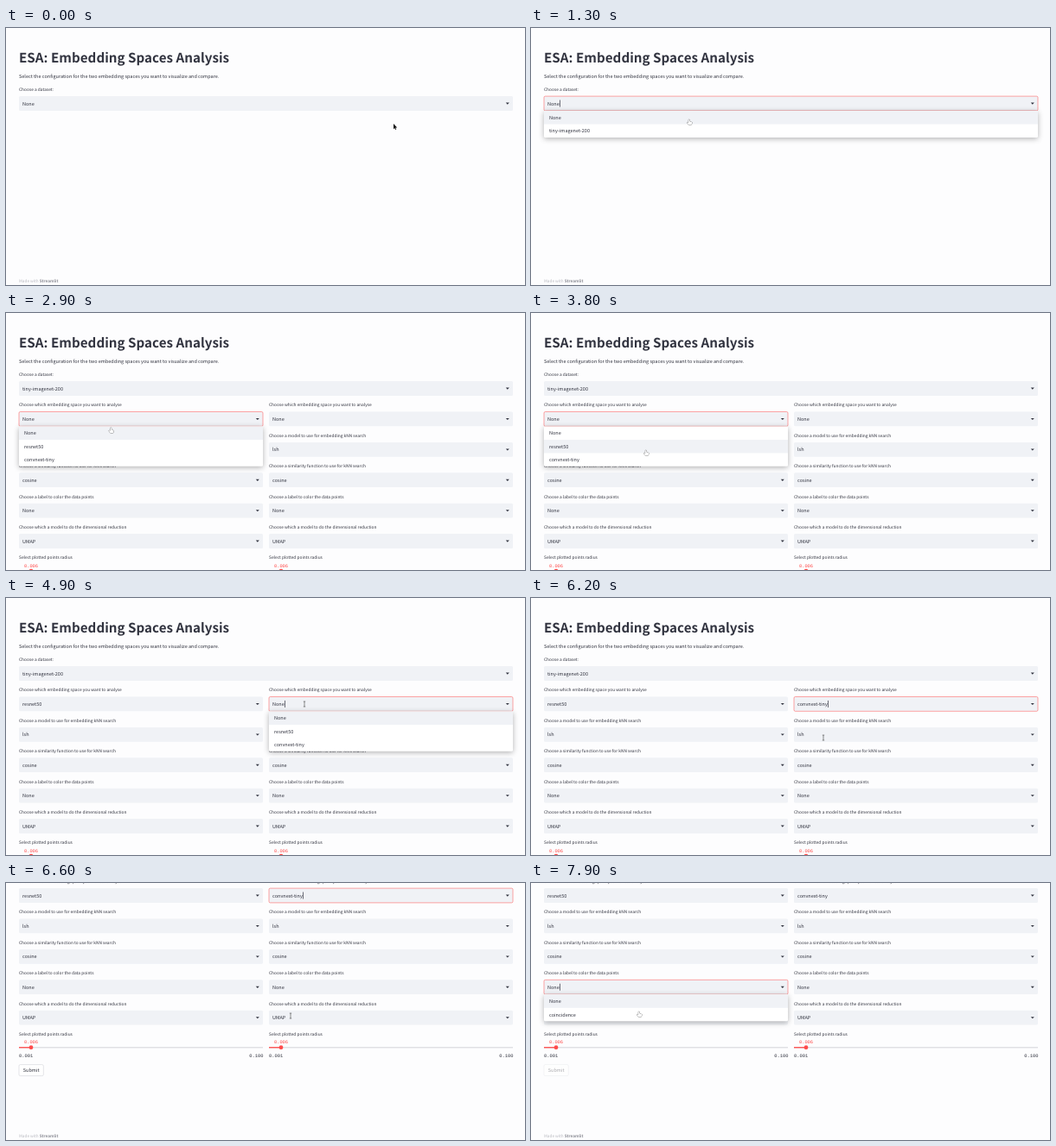
These frames come from a looping animation (600 by 298 pixels, 8000 ms). An HTML page with a canvas:

```html
<!DOCTYPE html>
<html lang="en">
<head>
<meta charset="utf-8">
<title>ESA: Embedding Spaces Analysis</title>
<style>
  html, body { margin: 0; width: 100%; height: 100%; overflow: hidden; background: #fdfdfe; }
  canvas { display: block; }
</style>
</head>
<body>
<canvas id="stage" width="600" height="298"></canvas>
<script>
const ctx = document.getElementById('stage').getContext('2d');
const LOOP = 8000, TICK = 100;
const INK = '#31333f', RED = '#ff4b4b', FIELD = '#f0f2f6', PAGE = '#fdfdfe';
const SANS = '"Noto Sans CJK JP", "Noto Sans CJK SC", "Open Sans", sans-serif';
const MONO = '"Liberation Mono", monospace';
const BODY = 5.52, SMALL = 4.85;
const COLUMNS = [15, 304], COLUMN_WIDTH = 282, FULL_WIDTH = 571;
const FIRST_ROW = 87.5, ROW_STEP = 35.4, ITEM = 15.45, MAX_SCROLL = 108.4;

const rows = [
  ['Choose a dataset:', 'None'],
  ['Choose which embedding space you want to analyse', 'None'],
  ['Choose a model to use for embedding kNN search', 'lsh'],
  ['Choose a similarity function to use for kNN search', 'cosine'],
  ['Choose a label to color the data points', 'None'],
  ['Choose which a model to do the dimensional reduction', 'UMAP'],
];

// Each visit: focus from open to blur, list shown from open to close, then options[pick] is set.
const spaces = ['None', 'resnet50', 'convnext-tiny'];
const visits = [
  { row: 0, col: 0, open: 600, close: 1700, blur: 2700, options: ['None', 'tiny-imagenet-200'], pick: 1, hover: [[0, 0], [1500, 1]] },
  { row: 1, col: 0, open: 2700, close: 4000, blur: 4900, options: spaces, pick: 1, hover: [[0, 0], [3100, 1]], noCaret: true },
  { row: 1, col: 1, open: 4900, close: 6000, blur: 7300, options: spaces, pick: 2, hover: [[0, 0], [5300, 1], [5700, 2]] },
  { row: 4, col: 0, open: 7300, close: LOOP, blur: LOOP, options: ['None', 'coincidence'], pick: 1, hover: [[0, 0]] },
];

// time, x, y
const mousePath = [
  [0, 448, 111], [300, 339, 84], [500, 338, 84], [900, 230, 92], [1300, 183, 109],
  [1600, 172, 119], [1700, 170, 119], [2200, 117, 125], [2300, 118, 126], [2700, 118, 126],
  [3300, 131, 164], [3700, 131, 164], [3800, 133, 162], [4000, 134, 160], [4600, 330, 120],
  [4900, 345, 123], [5400, 343, 160], [5500, 343, 160], [5800, 341, 170], [6000, 341, 170],
  [6200, 338, 162], [6600, 329, 154], [6800, 326, 151], [7200, 130, 121], [7300, 125, 121],
  [7700, 124, 147], [7800, 124, 147], [7900, 125, 152],
];

const smooth = p => p * p * (3 - 2 * p);
const clamp = p => Math.max(0, Math.min(1, p));
const latest = (steps, t) => steps.filter(s => s[0] <= t).pop()[1];
const rowY = row => FIRST_ROW + row * ROW_STEP;
const rowWidth = row => row ? COLUMN_WIDTH : FULL_WIDTH;

function mouseAt(t) {
  const next = mousePath.findIndex(k => k[0] > t);
  if (next < 0) return mousePath[mousePath.length - 1].slice(1);
  const [t0, x0, y0] = mousePath[next - 1], [t1, x1, y1] = mousePath[next];
  const p = smooth((t - t0) / (t1 - t0));
  return [x0 + (x1 - x0) * p, y0 + (y1 - y0) * p];
}

// Draws text centred vertically on y and returns its width; the large font keeps advances exact.
function text(string, x, y, { size = BODY, color = INK, weight = 400, family = SANS, align = 'left' } = {}) {
  ctx.save();
  ctx.translate(x, y + size * 0.37);
  ctx.scale(0.1, 0.1);
  ctx.font = `${weight} ${size * 10}px ${family}`;
  ctx.textRendering = 'geometricPrecision';
  ctx.textAlign = align;
  ctx.fillStyle = color;
  ctx.fillText(string, 0, 0);
  const width = ctx.measureText(string).width / 10;
  ctx.restore();
  return width;
}

function box(x, y, w, h, fill, stroke, lineWidth = 0.5) {
  ctx.beginPath();
  ctx.roundRect(x, y, w, h, 1.5);
  ctx.fillStyle = fill;
  ctx.fill();
  if (!stroke) return;
  ctx.strokeStyle = stroke;
  ctx.lineWidth = lineWidth;
  ctx.stroke();
}

function select(row, col, t) {
  const x = COLUMNS[col], y = rowY(row), w = rowWidth(row);
  const own = visits.filter(v => v.row === row && v.col === col);
  const done = own.find(v => t >= v.close);
  const focus = own.find(v => t >= v.open && t < v.blur);
  const value = done ? done.options[done.pick] : rows[row][1];
  text(rows[row][0], x, y - 16.2, { size: SMALL });
  box(x, y - 8.4, w, 16.8, FIELD, focus && RED);
  const width = text(value, x + 4, y);
  if (focus && !(focus.noCaret && t < focus.close)) {
    ctx.fillStyle = INK;
    ctx.fillRect(x + 4.3 + width, y - 4, 0.7, 8);
  }
  const ax = x + w - 6.2;
  ctx.fillStyle = INK;
  ctx.beginPath();
  ctx.moveTo(ax - 2, y - 0.9);
  ctx.lineTo(ax + 2, y - 0.9);
  ctx.lineTo(ax, y + 1.2);
  ctx.fill();
}

function popup({ row, col, options, hover }, t) {
  const x = COLUMNS[col], y = rowY(row) + 8.6, w = rowWidth(row);
  ctx.save();
  ctx.shadowColor = 'rgba(0,0,0,.3)';
  ctx.shadowBlur = 6;
  ctx.shadowOffsetY = 1.5;
  box(x, y, w, ITEM * options.length, '#fff');
  ctx.restore();
  ctx.fillStyle = FIELD;
  ctx.fillRect(x, y + latest(hover, t) * ITEM, w, ITEM);
  options.forEach((option, i) => text(option, x + 6, y + (i + 0.5) * ITEM));
}

function slider(x) {
  const mono = { size: 5.4, family: MONO };
  text('Select plotted points radius', x, 283.5, { size: SMALL });
  text('0.006', x + 14, 292.6, { ...mono, color: RED, align: 'center' });
  ctx.fillStyle = '#dcdde2';
  ctx.fillRect(x, 298.5, COLUMN_WIDTH, 1.3);
  ctx.fillStyle = RED;
  ctx.fillRect(x, 298.5, 14, 1.3);
  ctx.beginPath();
  ctx.arc(x + 14, 299.1, 2.4, 0, 7);
  ctx.fill();
  text('0.001', x, 308.4, mono);
  text('0.100', x + COLUMN_WIDTH + 0.5, 308.4, { ...mono, align: 'right' });
}

function submitButton(stale) {
  ctx.save();
  ctx.globalAlpha = stale ? 0.4 : 1;
  box(15, 319, 28.3, 13, '#fff', '#c9cad0');
  text('Submit', 29.2, 325.5, { align: 'center' });
  ctx.restore();
}

const cursors = {
  arrow: 'M0 0V6.2L1.4 5L2.3 7L3.2 6.6L2.3 4.6H4.2Z',
  hand: 'M-.8-2.6Q0-3.4.5-2.6V-.6L2.6 0Q3.3.3 3 1.5L2.4 3.2H-.8L-2.5.9Q-2.5.1-1.6.4L-.8 1Z',
  beam: 'M-1.2-3H1.2M0-3V3M-1.2 3H1.2',
};

function cursor(t, [x, y], scroll) {
  const pageY = y + scroll;
  const inside = (row, col, top, bottom) =>
    x >= COLUMNS[col] && x <= COLUMNS[col] + rowWidth(row) && pageY >= top && pageY <= bottom;
  const overList = visits.some(v => t >= v.open && t < v.close &&
    inside(v.row, v.col, rowY(v.row) + 8.6, rowY(v.row) + 8.6 + ITEM * v.options.length));
  const overField = rows.some((_, row) => (row === 0 || t >= 1900) &&
    [0, 1].some(col => (row || !col) && inside(row, col, rowY(row) - 9, rowY(row) + 9)));
  const kind = overList ? 'hand' : overField ? 'beam' : 'arrow';
  const path = new Path2D(cursors[kind]);
  ctx.save();
  ctx.translate(x, y);
  ctx.lineWidth = 0.6;
  ctx.strokeStyle = kind === 'arrow' ? '#fff' : '#444';
  ctx.stroke(path);
  if (kind !== 'beam') {
    ctx.fillStyle = kind === 'arrow' ? '#111' : '#fff';
    ctx.fill(path);
  }
  ctx.restore();
}

function draw(t) {
  const scroll = MAX_SCROLL * smooth(clamp((t - 6200) / 400));
  const expanded = t >= 1900;
  ctx.fillStyle = PAGE;
  ctx.fillRect(0, 0, 600, 298);
  ctx.save();
  ctx.translate(0, -scroll);
  text('ESA: Embedding Spaces Analysis', 15, 34.6, { size: 15.2, weight: 700 });
  text('Select the configuration for the two embedding spaces you want to visualize and compare.', 15, 55.6);
  select(0, 0, t);
  if (expanded) {
    for (let row = 1; row < rows.length; row++) COLUMNS.forEach((_, col) => select(row, col, t));
  }
  if (t >= 2300) {
    COLUMNS.forEach(slider);
    submitButton(t >= 7000);
  }
  const footerY = 293.5 + (expanded ? MAX_SCROLL : 0);
  const madeWidth = text('Made with ', 15, footerY, { size: 4.7, color: '#b9bac0' });
  text('Streamlit', 15 + madeWidth, footerY, { size: 4.7, color: '#8b8c94', weight: 700 });
  visits.filter(v => t >= v.open && t < v.close).forEach(v => popup(v, t));
  ctx.restore();
  cursor(t, mouseAt(t), scroll);
}

const start = performance.now();
function frame() {
  const t = (performance.now() - start) % LOOP;
  draw(Math.floor(t / TICK) * TICK);
  requestAnimationFrame(frame);
}
frame();
</script>
</body>
</html>
```
